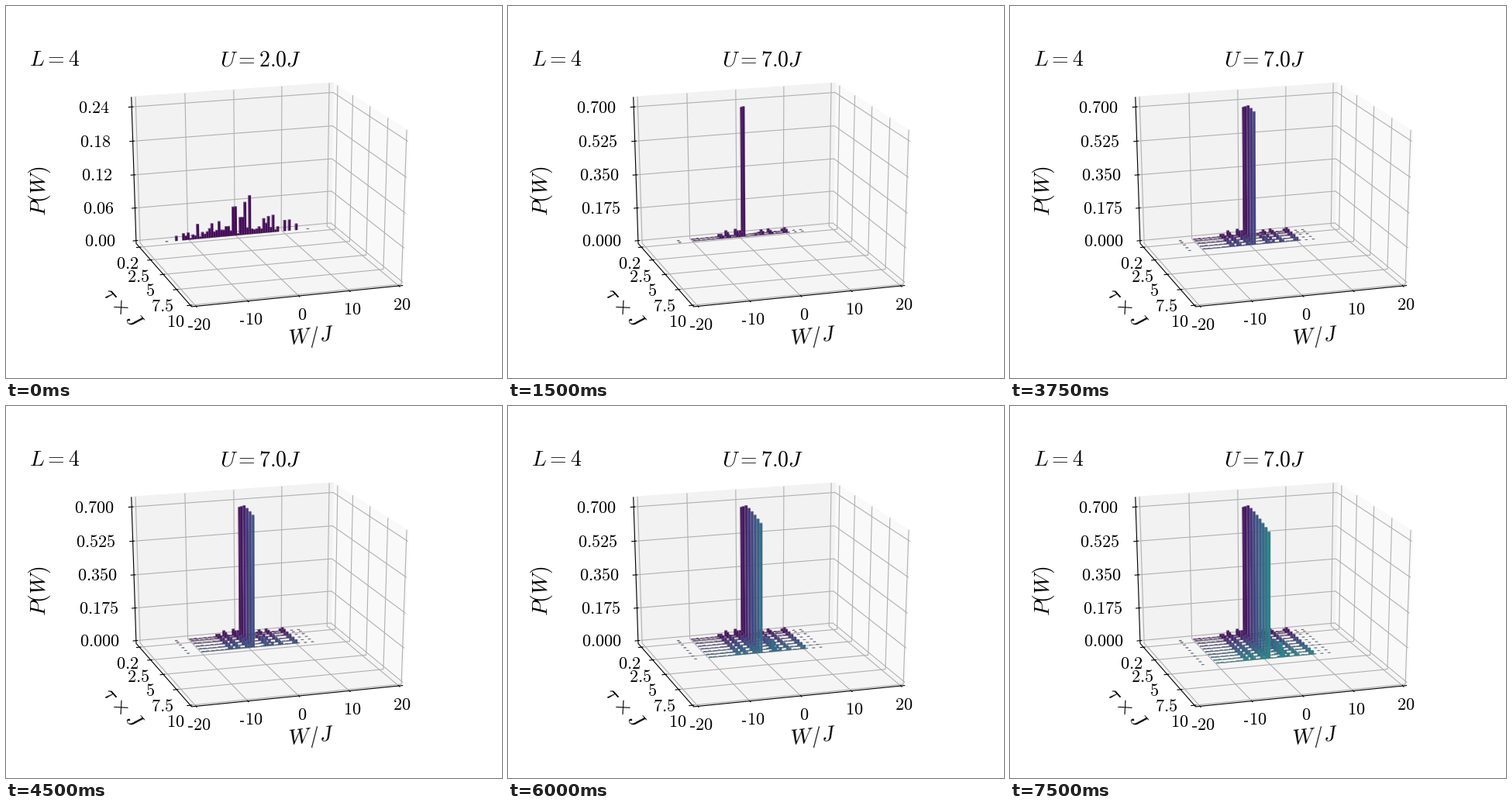
These frames come from a looping animation (640 by 480 pixels, 8 s). A matplotlib script:

```python
import numpy as np
import matplotlib.pyplot as plt
from matplotlib.animation import FuncAnimation
from matplotlib.collections import PolyCollection

plt.rcParams["mathtext.fontset"] = "cm"

ELEV, TURN, DIST = np.radians(21.2), np.radians(17.5), 10
FX, FY, CX, CY = 2681, 1998, 334.7, 237.4
H = 25 / 48            # half size of the panes; the data cube has half size 0.5
OUT, IN = H + .0174, H - .0087
BIN, SHIFT, DEPTH = 0.5, 0.16, 0.08
ROW_PX = 176           # pixels per full axis height at the back row


def project(x, y, z):
    s, c, se, ce = np.sin(TURN), np.cos(TURN), np.sin(ELEV), np.cos(ELEV)
    away = x * s + y * c
    d = DIST + ce * away - se * z
    return (CX + FX * (x * c - y * s) / d,
            CY - FY * (se * away + ce * z) / d)


def w_pos(w):
    return w / 40


def tau_pos(tau):
    return 0.473 - 0.0973 * tau


def z_pos(k):
    return k / 4.2 - 0.5


def spectrum(lo, hi, floor, peaks, width):
    """Bin numbers and heights in pixels: a rough floor with peaks on it."""
    i = np.arange(lo, hi + 1)
    h = floor * np.random.default_rng(4).uniform(.2, 1.8, i.size)
    for centre, top in peaks:
        h = np.maximum(h, top * np.exp(-((i - centre) / width) ** 2))
    return list(zip(i, h))


def weak_bars():
    peaks = [(-18, 19), (-12.4, 25), (-9, 20), (-5.5, 21), (-2.5, 62),
             (.5, 38), (2, 42), (4, 50), (10.4, 26), (12, 21), (14, 22)]
    tail = [(-31, .2), (-27, 6), (19, 14), (21, 14), (24, 8), (29, .2)]
    return spectrum(-24, 16, 5, peaks, .7) + tail


def strong_bars(tau):
    main = .954 - .045 * max(1 - tau, 0) - .011 * max(tau - 1, 0) ** 1.5
    peaks = [(-9.5, 5.5), (-6.8, 8), (-2.8, 9), (-1, 6), (5.2, 4.5 * tau),
             (7.8, 5), (11.3, 6), (17.6, 6)]
    bars = spectrum(-21, 19, .5, peaks, .8)
    return [(i, main * ROW_PX if i == 0 else h)
            for i, h in [(-27, .2)] + bars + [(22, .2), (25, .2)]]


def bar_faces(i, height, tau):
    x0, x1 = w_pos(BIN * i + SHIFT), w_pos(BIN * (i + 1) + SHIFT)
    yf, yb = tau_pos(tau), tau_pos(tau - DEPTH)
    z0, z1 = -0.5, height - 0.5
    left = [(x0, yb, z0), (x0, yf, z0), (x0, yf, z1), (x0, yb, z1)]
    top = [(x0, yf, z1), (x1, yf, z1), (x1, yb, z1), (x0, yb, z1)]
    front = [(x0, yf, z0), (x1, yf, z0), (x1, yf, z1), (x0, yf, z1)]
    return [[project(*p) for p in face] for face in (left, top, front)]


fig = plt.figure(figsize=(6.4, 4.8), dpi=100, facecolor="white")
ax = fig.add_axes([0, 0, 1, 1])
ax.set_xlim(0, 640)
ax.set_ylim(480, 0)
ax.axis("off")


def pane(corners, grey):
    ax.fill(*zip(*(project(*p) for p in corners)), facecolor=str(grey),
            edgecolor=str(grey), lw=0.8, zorder=0)


def path(*points, color="#b0b0b0", zorder=1):
    ax.plot(*zip(*(project(*p) for p in points)), color=color, lw=0.8,
            zorder=zorder, solid_capstyle="butt")


def label(x, y, text, size=16, va="center", **kw):
    return ax.text(x, y, f"${text}$", fontsize=size, ha="center", va=va,
                   zorder=5, **kw)


pane([(H, H, -H), (H, -H, -H), (H, -H, H), (H, H, H)], .975)
pane([(-H, H, -H), (H, H, -H), (H, H, H), (-H, H, H)], .95)
pane([(-H, H, -H), (H, H, -H), (H, -H, -H), (-H, -H, -H)], .9625)

for w in range(-20, 21, 10):
    x = w_pos(w)
    path((x, H, H), (x, H, -H), (x, -H, -H))
    path((x, -OUT, -H), (x, -IN, -H), color="k", zorder=2)
    px, py = project(x, -H, -H)
    px, py = px + 4, py + 24.5
    if w < 0:
        # a hyphen, shorter than the minus sign of the math font
        ax.plot([px - 14.3, px - 8.6], [py + 2.2] * 2, color="k", lw=1.1,
                solid_capstyle="butt")
        px += 3.7
    label(px, py, abs(w))

for tau in (0.2, 2.5, 5, 7.5, 10):
    y = tau_pos(tau)
    path((-H, y, -H), (H, y, -H), (H, y, H))
    path((-OUT, y, -H), (-IN, y, -H), color="k", zorder=2)
    px, py = project(-H, y, -H)
    label(px - 15.5 - .35 * tau, py + 22, tau)

z_labels = []
for k in range(5):
    z = z_pos(k)
    path((-H, H, z), (H, H, z), (H, -H, z))
    path((-OUT, H, z), (-IN, H, z), color="k", zorder=2)
    px, py = project(-H, H, z)
    z_labels.append(label(px - 46.5 - .5 * k, py + 1.3, "0"))
path((-H, H, H), (-H, H, -H), (-H, -H, -H), (H, -H, -H), color="k", zorder=2)

label(62.5, 77, "L=4", 20, va="baseline")
title = label(329, 78, "U", 20, va="baseline")
label(44, 239, "P(W)", 20, rotation=90)
label(394.5, 428, "W/J", 20, rotation=5.9)
label(151, 389, r"\tau \times J", 20, rotation=-48)

bars = PolyCollection([], edgecolors=(.45, .45, .45, .5), linewidths=0.25,
                      zorder=3)
ax.add_collection(bars, autolim=False)


def update(frame):
    step = frame // 3
    strong = step >= 2
    faces, colors = [], []
    for row in range(step if strong else step + 1):
        tau = max(0.2, row / 2)
        rgb = np.array(plt.cm.viridis(tau / 10)[:3])
        for i, h in reversed(strong_bars(tau) if strong else weak_bars()):
            faces += bar_faces(i, h / ROW_PX, tau)
            colors += [rgb * .7, rgb * .85, rgb]
    bars.set_verts(faces)
    bars.set_facecolor(colors)
    for k, t in enumerate(z_labels):
        t.set_text(f"${k * .175:.3f}$" if strong else f"${k * .06:.2f}$")
    title.set_text(f"$U={7.0 if strong else 2.0}J$")
    return [bars, title, *z_labels]


anim = FuncAnimation(fig, update, frames=32, interval=250, repeat=True,
                     repeat_delay=0, blit=False)
plt.show()
```
